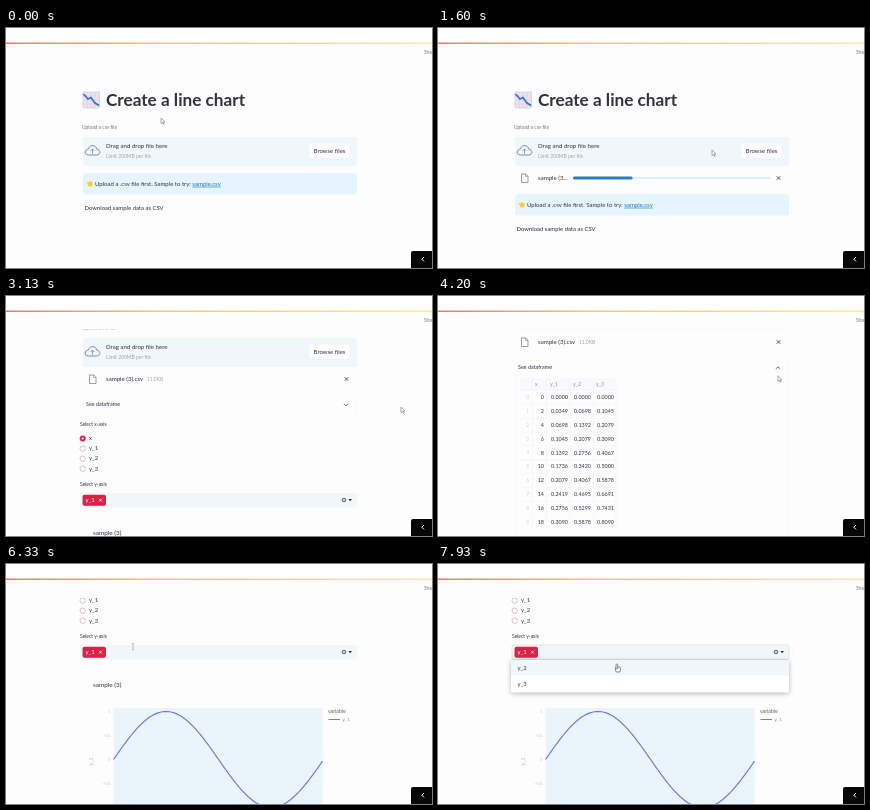
Recreate the animation shown at these times as an HTML page with a canvas. Size 426 by 240 pixels, loop 8 s.

```html
<!DOCTYPE html>
<html lang="en">
<head>
<meta charset="utf-8">
<title>Create a line chart</title>
<style>
  html, body { margin: 0; width: 100%; height: 100%; overflow: hidden; background: #fdfdfd; }
  canvas { display: block; width: 100vw; height: 100vh; }
</style>
</head>
<body>
<canvas id="stage" width="426" height="240"></canvas>
<script>
const ctx = document.getElementById('stage').getContext('2d');
const LOOP = 8000, PAGE = '#fdfdfd', INK = '#31333f', GREY = '#a0a3ab', RED = '#dc2145', PANEL = '#f0f7fb';
const HEADER_BOTTOM = 33.5, TABLE_HEIGHT = 162, TABLE_ROWS = 10;
const UPLOAD_START = 1300, UPLOAD_END = 2150, MENU_OPEN = 6750;

// Keyframes: [time, value, ...]
const scrollKeys = [[2250, 0], [2900, 67], [3600, 67], [4000, 104], [4700, 104], [5400, 143.5], [5700, 143.5], [6200, 183]];
const expandKeys = [[3480, 0], [3680, 1], [4500, 1], [4700, 0]];
const progressKeys = [[UPLOAD_START, 0], [1600, 0.3], [2100, 1]];
const cursorKeys = [[0, 155, 90], [200, 155, 90], [1300, 274, 122], [1900, 274, 122], [2800, 395, 111], [3130, 395, 111],
  [3450, 340, 108], [4550, 340, 71], [5300, 281, 95], [5600, 281, 95], [6250, 127, 81], [6800, 127, 81], [7400, 179, 101]];

function at(keys, t, column = 1, ease = true) {
  if (t <= keys[0][0]) return keys[0][column];
  const next = keys.findIndex(k => k[0] > t);
  if (next < 0) return keys[keys.length - 1][column];
  const a = keys[next - 1], b = keys[next];
  let u = (t - a[0]) / (b[0] - a[0]);
  if (ease) u = u * u * (3 - 2 * u);
  return a[column] + (b[column] - a[column]) * u;
}

function text(str, x, y, size = 6.1, color = INK, { weight = 400, align = 'left' } = {}) {
  ctx.font = `${weight} ${size}px Lato, sans-serif`;
  ctx.textAlign = align;
  ctx.textBaseline = 'middle';
  ctx.fillStyle = color;
  ctx.fillText(str, x, y);
}

function box(x, y, w, h, fill, radius = 2, stroke) {
  ctx.beginPath();
  ctx.roundRect(x, y, w, h, radius);
  ctx.fillStyle = fill;
  ctx.fill();
  if (stroke) { ctx.strokeStyle = stroke; ctx.lineWidth = 0.6; ctx.stroke(); }
}

function line(points, color = INK, width = 0.8) {
  ctx.beginPath();
  points.forEach(([x, y]) => ctx.lineTo(x, y));
  ctx.strokeStyle = color;
  ctx.lineWidth = width;
  ctx.stroke();
}

function disc(x, y, r, fill, stroke) {
  ctx.beginPath();
  ctx.arc(x, y, r, 0, 7);
  if (fill) { ctx.fillStyle = fill; ctx.fill(); }
  if (stroke) { ctx.strokeStyle = stroke; ctx.lineWidth = 0.8; ctx.stroke(); }
}

function cross(x, y, r, color = INK) {
  line([[x - r, y - r], [x + r, y + r]], color);
  line([[x - r, y + r], [x + r, y - r]], color);
}

function chevron(x, y, up = false) {
  const d = up ? -1 : 1;
  line([[x - 2, y - d], [x, y + d], [x + 2, y - d]]);
}

function heading() {
  box(77, 64, 16.5, 16, '#f0e3ef', 1, '#c6c5dc');
  for (let i = 1; i < 4; i++) {
    line([[77 + i * 4, 64], [77 + i * 4, 80]], '#c9cfe6', 0.6);
    line([[77, 64 + i * 4], [93.5, 64 + i * 4]], '#c9cfe6', 0.6);
  }
  line([[77.5, 66], [82, 71], [85, 69.5], [89, 75], [93, 77.5]], '#2878b8', 1.7);
  text('Create a line chart', 100, 72.5, 17.2, INK, { weight: 700 });
}

function cloud(x, y) {
  ctx.beginPath();
  ctx.moveTo(x - 4, y + 4);
  ctx.bezierCurveTo(x - 9, y + 4, x - 8, y - 2, x - 4, y - 2);
  ctx.bezierCurveTo(x - 3, y - 7, x + 4, y - 6, x + 4, y - 2);
  ctx.bezierCurveTo(x + 9, y - 1, x + 8, y + 4, x + 4, y + 4);
  ctx.closePath();
  ctx.strokeStyle = '#858a96';
  ctx.lineWidth = 1;
  ctx.stroke();
  line([[x, y + 3], [x, y - 2]], '#858a96');
  line([[x - 2, y], [x, y - 2], [x + 2, y]], '#858a96');
}

function uploader() {
  text('Upload a csv file', 76, 99.3, 4.9, '#777983');
  box(77, 109, 274, 29, PANEL);
  cloud(86.5, 123);
  text('Drag and drop file here', 100, 118.5);
  text('Limit 200MB per file', 100, 128.5, 5, GREY);
  box(303, 115, 41, 15.5, '#fff', 2, '#eceef2');
  text('Browse files', 323.5, 123, 6, INK, { align: 'center' });
}

function fileRow(t) {
  const done = t >= UPLOAD_END;
  line([[83.5, 146], [88, 146], [90, 148.2], [90, 154.5], [83.5, 154.5], [83.5, 145.6]], '#858a96');
  line([[87.5, 146], [87.5, 148.5], [90, 148.5]], '#858a96', 0.6);
  text(done ? 'sample (3).csv' : 'sample (3...', 100, 150, 6.1);
  cross(340.5, 150, 1.8);
  if (done) return text('11.0KB', 141, 150.2, 4.9, GREY);
  box(135, 149, 198, 2, '#d9f0f5', 1);
  box(135, 148.5, 198 * at(progressKeys, t, 1, false), 3, '#2a7fbd', 1.5);
}

function hint(shift) {
  const y = 156 + shift, message = 'Upload a .csv file first. Sample to try: ';
  box(77, y - 11, 274, 21.5, '#e6f5fd');
  box(82, y - 2.5, 4.5, 5, '#f5d03b', 1.5);
  line([[80.5, y - 1], [83, y - 1]], '#f5d03b', 1.4);
  text(message, 89, y, 6);
  const x = 89 + ctx.measureText(message).width;
  text('sample.csv', x, y, 6, '#1673b8');
  line([[x, y + 3], [x + ctx.measureText('sample.csv').width, y + 3]], '#1673b8', 0.6);
  text('Download sample data as CSV', 78.5, 180.5 + shift, 5.95);
}

function expander(open) {
  const height = 18 + open * TABLE_HEIGHT;
  box(77, 167, 274, height, PAGE, 2, '#f6f7f9');
  text('See dataframe', 80, 175.8, 5.4);
  chevron(340, 175.8, open > 0.5);
  if (!open) return;
  ctx.save();
  ctx.beginPath();
  ctx.rect(77, 185, 274, height - 18);
  ctx.clip();
  box(82, 186, 96, 12.5, '#f7fafc', 0);
  const columns = [106, 130, 153, 176];
  ['x', 'y_1', 'y_2', 'y_3'].forEach((name, i) => text(name, [97, 112, 135, 158][i], 192, 5.2, '#8b90a0'));
  [94.5, 108.5, 132, 155.5, 178].forEach(x => line([[x, 186], [x, 337]], '#edf0f3', 0.5));
  for (let row = 0; row < TABLE_ROWS; row++) {
    const y = 205.5 + row * 13.85, degrees = row * 2;
    text(row, 91, y, 4.8, '#cccfd6', { align: 'right' });
    columns.forEach((x, i) => {
      const value = i ? Math.sin(i * degrees * Math.PI / 180).toFixed(4) : degrees;
      text(value, x, y, 5.4, INK, { align: 'right' });
    });
    line([[82, y - 7], [178, y - 7]], '#edf0f3', 0.5);
  }
  ctx.restore();
}

function selectors(focused) {
  text('Select x-axis', 74, 196, 4.9);
  ['x', 'y_1', 'y_2', 'y_3'].forEach((name, i) => {
    const y = 209.5 + i * 10.1;
    disc(76.7, y, 2.7, i ? '#fff' : RED, i ? '#c9b3b3' : RED);
    if (!i) disc(76.7, y, 1, '#fff');
    text(name, 83, y, 5.9);
  });
  text('Select y-axis', 74, 255.3, 4.9);
  box(74, 264, 277, 14.5, PANEL, 2, focused ? '#f6cdbd' : null);
  box(76.5, 265.7, 23.5, 11, RED, 2);
  text('y_1', 79.5, 271, 5.9, '#fff');
  cross(94.5, 271.2, 1.5, '#fff');
  disc(338, 271, 2.3, '#70737d');
  cross(338, 271, 0.9, '#fff');
  ctx.beginPath();
  ctx.moveTo(342.3, 270);
  ctx.lineTo(346, 270);
  ctx.lineTo(344.15, 272.3);
  ctx.fillStyle = INK;
  ctx.fill();
}

function chart() {
  const left = 107.5, right = 316.5, mid = 378.5, amplitude = 48;
  text('sample (3)', 87, 303.7, 6.4);
  box(left, 327, right - left, 104, '#e9f4fb', 0);
  [['1', 1], ['0.5', 0.5], ['0', 0], ['−0.5', -0.5], ['−1', -1]].forEach(([label, v]) => {
    const y = mid - v * amplitude;
    line([[left, y], [right, y]], '#f4f9fc', 0.6);
    text(label, 104.5, y, 4.3, '#c3c7d0', { align: 'right' });
  });
  const curve = [];
  for (let d = 0; d <= 358; d += 2)
    curve.push([left + d / 358 * (right - left), mid - amplitude * Math.sin(d * Math.PI / 180)]);
  line(curve, '#707bdd', 1.2);
  ctx.save();
  ctx.translate(85.5, mid + 2);
  ctx.rotate(-Math.PI / 2);
  text('y_1', 0, 0, 5, '#aeb09f', { align: 'center' });
  ctx.restore();
  text('variable', 322, 330.5, 5.2, '#60636e');
  line([[322.5, 338.5], [334, 338.5]], '#707bdd', 1);
  text('y_1', 336.5, 338.5, 4.6, '#7a8298');
}

function menu() {
  ctx.save();
  ctx.shadowColor = 'rgba(40,45,60,.35)';
  ctx.shadowBlur = 5;
  ctx.shadowOffsetY = 1;
  box(73, 279, 278, 32.5, '#fff', 1);
  ctx.restore();
  box(73, 279, 278, 15.5, PANEL, 1);
  text('y_2', 79.5, 287, 5.9);
  text('y_3', 79.5, 303, 5.9);
}

function pageFrame() {
  box(0, 0, 426, HEADER_BOTTOM, PAGE, 0);
  box(0, 0, 426, 14.5, '#fff', 0);
  const fade = ctx.createLinearGradient(0, 0, 426, 0);
  fade.addColorStop(0, '#e8796f');
  fade.addColorStop(0.35, '#f4c477');
  fade.addColorStop(1, '#fbf07c');
  box(0, 14.4, 426, 1.5, fade, 0);
  text('Share', 418, 25, 4.8, '#777983');
  box(405, 223, 24, 20, '#070707', 2);
  line([[418, 229], [415.8, 231.2], [418, 233.4]], '#fff', 1);
}

function cursor(t) {
  ctx.save();
  ctx.translate(at(cursorKeys, t, 1), at(cursorKeys, t, 2));
  ctx.lineJoin = 'round';
  if (t > MENU_OPEN + 300) {
    box(-1.5, 2, 5, 5, '#fff', 1.5, '#444');
    box(-1, -1, 1.7, 5, '#fff', 0.8, '#444');
  } else if (t > 6150) {
    line([[-1, -1.5], [1, -1.5]], '#999', 0.6);
    line([[0, -1.5], [0, 5]], '#999', 0.6);
    line([[-1, 5], [1, 5]], '#999', 0.6);
  } else {
    ctx.beginPath();
    [[0, 0], [0, 5.5], [1.4, 4.3], [2.4, 6.5], [3.2, 6.1], [2.3, 4], [4, 4]].forEach(p => ctx.lineTo(...p));
    ctx.closePath();
    ctx.fillStyle = '#fff';
    ctx.fill();
    ctx.strokeStyle = '#777';
    ctx.lineWidth = 0.6;
    ctx.stroke();
  }
  ctx.restore();
}

function draw(now) {
  const t = now % LOOP, open = at(expandKeys, t);
  box(0, 0, 426, 240, PAGE, 0);
  ctx.save();
  ctx.translate(0, -at(scrollKeys, t));
  heading();
  uploader();
  if (t >= UPLOAD_START) fileRow(t);
  if (t < UPLOAD_END) {
    hint(t >= UPLOAD_START ? 21 : 0);
  } else {
    expander(open);
    ctx.translate(0, open * TABLE_HEIGHT);
    selectors(t >= MENU_OPEN);
    chart();
    if (t >= MENU_OPEN) menu();
  }
  ctx.restore();
  pageFrame();
  cursor(t);
  requestAnimationFrame(draw);
}

requestAnimationFrame(draw);
</script>
</body>
</html>
```
